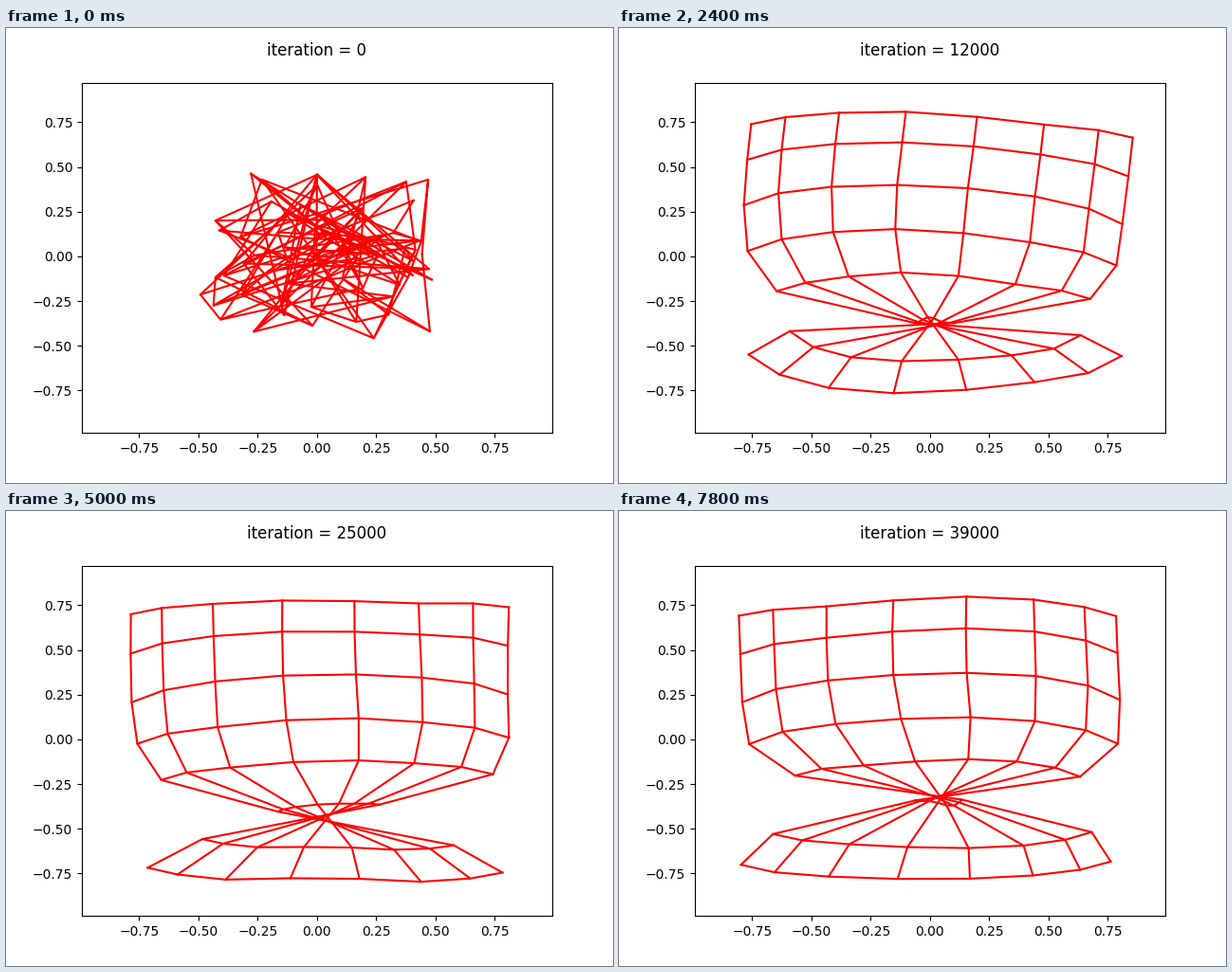
Write a matplotlib script that moves like this. It is 640 px wide and 480 px high and loops after 8 s.

```python
import numpy as np
import matplotlib.pyplot as plt
from matplotlib.animation import FuncAnimation

N = 8
FRAMES, INTERVAL, STEP = 40, 200, 1000

# Shape of the folded map over time: pinch x, pinch row, arch above and below.
KEYS = [5, 12, 18, 25, 34, 39]
PINCH = [-0.14, 0.02, -0.03, 0.04, -0.06, 0.04]
FOLD = [4.9, 5.1, 4.5, 5.25, 4.85, 4.9]
ARCH = [0.55, 0.2, 0.4, 0.18, 0.3, 0.2]
DISH = [0.1, 0.3, 0.25, 0.05, 0.08, 0.12]

row = np.arange(N)[:, None]
col = np.linspace(-1, 1, N)[None, :]


def folded_map(k):
    """Sheet that narrows to a pinch and opens again, mirrored, below it."""
    pinch, fold, arch, dish = (np.interp(k, KEYS, p)
                               for p in (PINCH, FOLD, ARCH, DISH))
    phase = np.pi * row / (N - 1)
    width = 0.8 * np.tanh(1.1 * (fold - row))
    bend = np.where(width > 0, arch * (0.6 + 0.4 * np.sin(np.pi * row / 5)), dish)
    x = width * np.sin(1.25 * col) / np.sin(1.25)
    y = 0.78 * np.cos(phase) - 0.12 * np.sin(2 * phase) - bend * width * col ** 2

    # The upper rows start out turned and straighten as the map settles.
    turn = 0.7 / (1 + (k / 8) ** 6) * (1 - (row / (N - 1)) ** 2)
    x, y = (x * np.cos(turn) + y * np.sin(turn),
            y * np.cos(turn) - x * np.sin(turn))
    x = x + pinch * np.exp(-((row - fold) / 2) ** 2)
    return np.stack([x, y], axis=-1)


def wobble(k):
    """Random offsets that vary smoothly over the map."""
    modes = np.arange(5)
    wave = np.cos(np.pi * np.outer(np.arange(N) / (N - 1), modes))
    weight = 1 / (1 + modes[:, None] + modes)
    amp = np.random.default_rng(k).normal(size=(5, 5, 2)) * weight[..., None]
    return np.einsum("ri,cj,ijd->rcd", wave, wave, amp)


def nodes(k):
    if k == 0:
        return np.random.default_rng(4).uniform(-0.5, 0.5, (N, N, 2))
    spread = 0.6 + 0.4 * min(k / KEYS[0], 1) ** 0.5
    return spread * folded_map(k) + 0.015 * wobble(k)


fig, ax = plt.subplots(figsize=(6.4, 4.8), dpi=100)
ax.set_xlim(-0.9915, 0.9925)
ax.set_ylim(-0.9875, 0.9716)
ticks = np.arange(-0.75, 0.8, 0.25)
ax.set_xticks(ticks)
ax.set_yticks(ticks)
title = ax.text(0, 1.125, "", ha="center", fontsize=12)
lines = [ax.plot([], [], "r", lw=1.5)[0] for _ in range(2 * N)]


def update(k):
    grid = nodes(k)
    for line, path in zip(lines, [*grid, *grid.transpose(1, 0, 2)]):
        line.set_data(path[:, 0], path[:, 1])
    title.set_text(f"iteration = {k * STEP}")
    return [*lines, title]


anim = FuncAnimation(fig, update, frames=FRAMES, interval=INTERVAL,
                     repeat=True, repeat_delay=0, blit=False)
plt.show()
```
